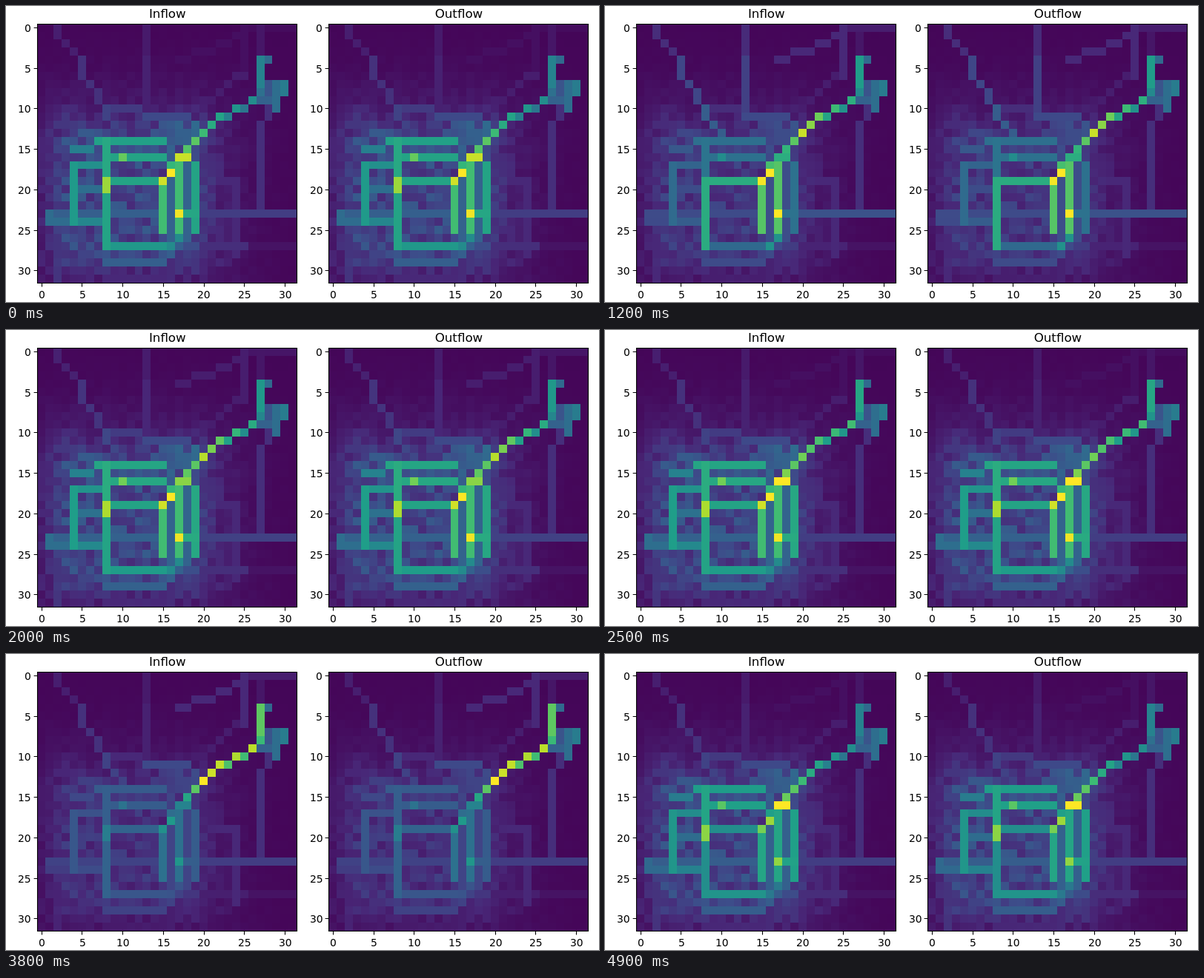
Write an HTML page with a canvas that moves like this. It is 800x400 px and loops after 5000 ms.

```html
<!DOCTYPE html>
<html lang="en">
<head>
<meta charset="utf-8">
<title>Inflow and Outflow</title>
<style>
  html, body { margin: 0; width: 800px; height: 400px; overflow: hidden; background: #fff; }
  canvas, svg { position: absolute; left: 0; top: 0; }
  text { font: 13.89px "DejaVu Sans", sans-serif; }
  .title { font-size: 16.67px; text-anchor: middle; }
  path { fill: none; stroke: #000; stroke-width: 1.11; }
</style>
</head>
<body>
<canvas id="map" width="800" height="400"></canvas>
<svg id="axes" width="800" height="400"></svg>
<script>
const N = 32, SIZE = 350, CELL = SIZE / N, TOP = 23.6;
const panels = [["Inflow", 42.3], ["Outflow", 435.46]];
const viridis = ["440154", "482878", "3e4a89", "31688e", "26828e", "1f9e89", "35b779", "6ece58", "b5de2b", "fde725"]
  .map(h => [0, 2, 4].map(i => parseInt(h.substr(i, 2), 16)));

// Traffic of each part of town at a few steps; all between is blended
const keySteps = [0, 12, 16, 25, 32, 38, 49];
const traffic = {
  city:    [1, .64, 1.03, 1.03, .77, .5, .97],
  core:    [1, 1.06, 1, 1, .92, .54, .85],
  knot:    [.92, .62, .68, 1, .64, .45, 1],
  hub:     [.68, .92, .98, .78, 1, 1, .68],
  port:    [.49, .63, .55, .69, .88, .9, .49],
  evening: [0, 1, .3, 0, .8, 0, 0],
  coast:   [0, 1, 1, 0, 0, 1, 0]
};
const ctx = document.getElementById("map").getContext("2d");
const grid = new Float32Array(N * N);

const lerp = (a, b, u) => a + (b - a) * u;

function color(v) {
  const p = Math.min(Math.max(v, 0), 1) * 9, i = Math.min(Math.floor(p), 8);
  return `rgb(${viridis[i].map((c, k) => Math.round(lerp(c, viridis[i + 1][k], p - i)))})`;
}

function hash(x, y) {
  const s = Math.sin(x * 127.1 + y * 311.7) * 43758.5453;
  return s - Math.floor(s);
}

function levels(step) {
  let i = 0;
  while (i < 5 && step >= keySteps[i + 1]) i++;
  const u = (step - keySteps[i]) / (keySteps[i + 1] - keySteps[i]), now = {};
  for (const name in traffic) now[name] = lerp(traffic[name][i], traffic[name][i + 1], u);
  return now;
}

function spot(v, x, y) {
  const i = y * N + x;
  grid[i] = Math.max(grid[i], v);
}

function road(v, ...p) {
  for (let i = 0; i + 3 < p.length; i += 2) {
    const dx = p[i + 2] - p[i], dy = p[i + 3] - p[i + 1];
    const n = Math.max(Math.abs(dx), Math.abs(dy));
    for (let k = 0; k <= n; k++)
      spot(v, Math.round(p[i] + dx * k / n), Math.round(p[i + 1] + dy * k / n));
  }
}

// Mottled side streets, fading with distance from the built-up block
function sideStreets(busy) {
  for (let y = 0; y < N; y++)
    for (let x = 0; x < N; x++) {
      const d = Math.hypot(Math.max(3 - x, 0, x - 19), Math.max(13 - y, 0, y - 28));
      const centre = x > 14 && x < 20 && y > 11 && y < 18 ? .25 : 0;
      const v = Math.max(.19 * Math.exp(-d / 3.3), centre);
      spot(.012 + v * busy * (.55 + .9 * hash(x, y)), x, y);
    }
}

function outskirts({ evening, coast }, busy) {
  const nw = .14 + .07 * evening;
  road(nw * .6, 2, 0, 2, 1, 5, 4);
  road(nw, 5, 4, 5, 6, 7, 8, 7, 9);
  road(nw * 1.4, 8, 10, 8, 11, 10, 13);
  road(.07 + .05 * evening, 13, 0, 13, 4);
  road(.09 + .1 * evening, 13, 4, 13, 11);
  road(.22, 13, 11, 18, 11);
  road(.17 * busy, 8, 10, 12, 10);
  road(.04 + .07 * coast, 17, 4, 20, 3, 23, 2, 25, 0, 25, 6);
  road(.03 + .05 * coast, 25, 0, 31, 0);
  road(.08, 25, 6, 24, 6, 21, 9, 19, 10);
  road(.06, 27, 0, 27, 3);
  road(.13, 28, 10, 27, 12, 27, 22);
  road(.11, 22, 19, 24, 19, 24, 28);
  road(.18 + .07 * evening, 20, 23, 31, 23);
  road(.13 * busy, 16, 27, 25, 27);
  road(.05, 26, 27, 31, 27);
  road(.15 * busy, 1, 19, 4, 19);
  road(.15 * busy, 2, 18, 2, 31);
  road(.15 * busy, 5, 25, 5, 28, 7, 30);
  road(.11 * busy, 8, 31, 15, 31);
  for (const x of [17, 19]) road(.15 * busy, x, 26, x, 30);
  road(.3 * busy, 8, 29, 14, 29, 16, 28, 17, 27);
}

function streets({ city, core }, busy) {
  for (const x of [16, 18]) road(.31 * busy, x, 17, x, 26);
  road(.57 * city, 7, 14, 15, 14);
  road(.43 * city, 4, 15, 6, 15);
  road(.58 * city, 9, 16, 15, 16);
  road(.5 * city, 8, 17, 4, 17);
  road(.54 * city, 4, 17, 4, 24);
  road(.46 * city, 4, 24, 8, 24);
  road(.35 * city, 1, 23, 1, 24, 3, 24);
  road(.3 * busy, 1, 23, 14, 23);
  road(.36 * city, 5, 20, 7, 20);
  road(.53 * city, 8, 27, 15, 27);
  road(.6 * city, 8, 14, 8, 18);
  road(.58 * city, 19, 17, 19, 25);
  road(.59 * city, 18, 23, 19, 23);
  spot(.76 * city, 10, 16);
  road(.58 * core, 15, 19, 8, 19, 8, 27);
  road(.85 * city, 8, 19, 8, 20);
  road(.69 * core, 15, 19, 15, 25);
  road(.69 * core, 17, 17, 17, 25);
  road(.48 * core, 17, 26, 16, 27);
  spot(.93 * core, 15, 19);
  spot(.98 * core, 17, 23);
}

function expressway({ core, knot, hub, port }) {
  spot(core, 16, 18);
  spot(.66 * core, 16, 17);
  road(knot, 17, 16, 18, 16);
  spot(lerp(knot, hub, .4) * .88, 18, 15);
  spot(.74, 19, 14);
  // Steep as far as column 22, then two columns to a row
  for (let x = 20; x <= 26; x++) {
    const y = x <= 22 ? 33 - x : 22 - Math.floor(x / 2);
    const shared = x > 22 && x % 2;
    spot(lerp(hub, port, (x - 20) / 6) * (shared ? .75 : .94 + .06 * (x === 20 || x === 26)), x, y);
  }
  road(port * .74 + .08, 27, 4, 27, 7);
  road(.34, 28, 4, 28, 4.1);
  road(port * .75, 27, 8, 27, 8.1);
  road(.31, 27, 9, 28, 9);
  road(.26, 28, 7, 28, 8);
  road(.36, 29, 7, 29, 10);
  road(.42, 30, 7, 30, 8);
}

function draw(now) {
  const level = levels(Math.floor(now / 100) % 50);
  const busy = .3 + .7 * level.city;
  grid.fill(0);
  sideStreets(busy);
  outskirts(level, busy);
  streets(level, busy);
  expressway(level);
  const edge = (start, i) => Math.round(start + i * CELL);
  grid.forEach((v, i) => {
    const x = i % N, y = Math.floor(i / N), t = edge(TOP, y);
    ctx.fillStyle = color(v);
    for (const [, left] of panels) {
      const l = edge(left, x);
      ctx.fillRect(l, t, edge(left, x + 1) - l, edge(TOP, y + 1) - t);
    }
  });
  requestAnimationFrame(draw);
}

const snap = v => Math.round(v) + .5;
let axes = "";
for (const [name, left] of panels) {
  axes += `<text class="title" x="${left + SIZE / 2 + .5}" y="16">${name}</text>`;
  let d = `M${snap(left)} ${snap(TOP)}h${SIZE}v${SIZE}h${-SIZE}z`;
  for (let n = 0; n <= 30; n += 5) {
    const x = left + (n + .5) * CELL, y = TOP + (n + .5) * CELL;
    const ink = 8.84 * String(n).length - 1.5;
    d += `M${snap(x)} ${snap(TOP + SIZE)}v4.9M${snap(left)} ${snap(y)}h-4.9`;
    axes += `<text x="${Math.round(x - ink / 2)}" y="395">${n}</text>`
      + `<text x="${Math.round(left - 9.72 - ink)}" y="${Math.round(y + 5) + 1}">${n}</text>`;
  }
  axes += `<path d="${d}"/>`;
}
document.getElementById("axes").innerHTML = axes;
requestAnimationFrame(draw);
</script>
</body>
</html>
```
